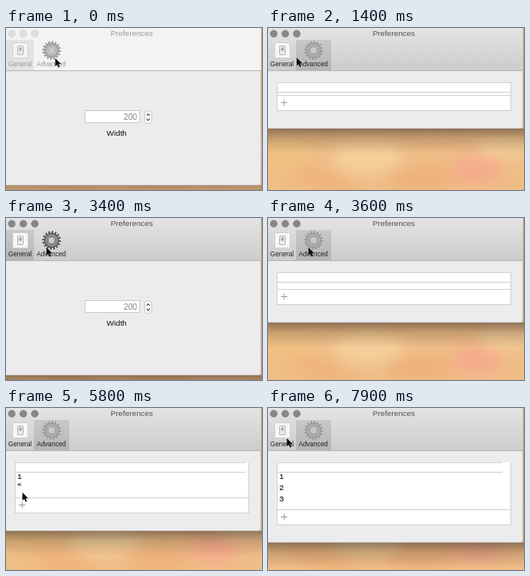
An HTML page that plays this animation: 320x203 px, repeating every 8 s.

```html
<!DOCTYPE html>
<html lang="en">
<head>
<meta charset="utf-8">
<title>Preferences window</title>
<style>
  html, body { margin: 0; width: 100%; height: 100%; overflow: hidden; background: #efbd87; }
  svg { display: block; width: 320px; height: 203px; }
  text { font-family: "Liberation Sans", Arial, sans-serif; font-size: 9.8px; fill: #111; }
  .label { font-size: 8.25px; text-anchor: middle; fill: #222; }
  .mid { text-anchor: middle; }
  .title { fill: #505050; }
  .lights circle { fill: #87878a; stroke: #79797c; stroke-width: .5; }
  .row text { stroke: #111; stroke-width: .15; }
  .crisp { shape-rendering: crispEdges; }
  .gear { color: #97979a; }
  .gear.down { color: #505052; }
  .down.switch { filter: brightness(.65); }
  .idle .title, .idle .label { fill: #9b9a9b; }
  .idle .lights circle { fill: #dedddf; stroke: #c9c8ca; }
  .idle #bar { fill: #f4f3f4; }
  .idle #tile { fill: #e2e1e3; }
  .idle .switch { opacity: .85; }
  .idle #shade { opacity: .65; }
</style>
</head>
<body>
<svg id="stage" viewBox="0 0 320 203">
  <defs>
    <linearGradient id="barFill" x2="0" y2="1">
      <stop stop-color="#e5e4e5"/><stop offset="1" stop-color="#cdcccd"/>
    </linearGradient>
    <linearGradient id="tileFill" x2="0" y2="1">
      <stop stop-color="#c9c8c9"/><stop offset="1" stop-color="#b6b5b6"/>
    </linearGradient>
    <linearGradient id="shadeFill" x2="0" y2="1">
      <stop stop-color="#2c2420" stop-opacity=".5"/>
      <stop offset=".4" stop-color="#3c2c20" stop-opacity=".22"/>
      <stop offset="1" stop-color="#4c3420" stop-opacity="0"/>
    </linearGradient>
    <filter id="soft" x="-50%" y="-50%" width="200%" height="200%"><feGaussianBlur stdDeviation="9"/></filter>
    <clipPath id="rowClip"><rect id="rowArea" x="12" width="291" y="81"/></clipPath>
  </defs>

  <rect width="320" height="203" fill="#efbd87"/>
  <g filter="url(#soft)">
    <ellipse cx="20" cy="160" rx="42" ry="20" fill="#f0c183"/>
    <ellipse cx="70" cy="192" rx="45" ry="12" fill="#efb27c" transform="rotate(20 70 192)"/>
    <ellipse cx="125" cy="163" rx="45" ry="20" fill="#f4cf9a"/>
    <ellipse cx="190" cy="188" rx="45" ry="14" fill="#eeb07c"/>
    <ellipse cx="262" cy="177" rx="32" ry="18" fill="#f5ab8b"/>
    <ellipse cx="295" cy="150" rx="35" ry="14" fill="#f3cd98"/>
  </g>
  <g id="shade">
    <rect id="below" width="320" height="32" fill="url(#shadeFill)"/>
    <rect id="side" x="319" width="1" fill="#3c2c20" opacity=".25"/>
  </g>

  <rect id="body" x="-8" y="-8" width="326.7" rx="4" fill="#ecebed" stroke="#a39d9a" stroke-width=".5"/>
  <rect id="bar" width="318.7" height="53" fill="url(#barFill)"/>
  <rect class="crisp" y="53" width="319" height="1" fill="#b8b7b8"/>
  <g class="lights">
    <circle cx="7.2" cy="7.2" r="4.4"/><circle cx="21.6" cy="7.2" r="4.4"/><circle cx="36" cy="7.2" r="4.4"/>
  </g>
  <text class="title mid" x="157.2" y="10.4">Preferences</text>

  <rect id="tile" class="crisp" y="15" height="38" fill="url(#tileFill)"/>
  <g class="switch" id="switch">
    <rect x="8.5" y="18.5" width="19" height="19" rx="1" fill="#f7f7f7" stroke="#cfcfcf"/>
    <rect x="14.5" y="22.5" width="7" height="11" rx=".8" fill="#ececec" stroke="#b2b2b2"/>
    <rect x="16.5" y="24.5" width="3" height="4" fill="#a2a2a2"/>
  </g>
  <text class="label" x="17.5" y="48">General</text>
  <g class="gear" id="gear" fill="none" stroke="currentColor">
    <circle cx="57" cy="28" r="10.4" stroke-width="2.6" pathLength="32" stroke-dasharray="1 1"/>
    <circle cx="57" cy="28" r="7.6" stroke-width="3.6"/>
    <circle cx="57" cy="28" r="7.3" stroke="#c6c5c4" stroke-width="1.6" opacity=".6"/>
    <circle cx="57" cy="28" r="4.6" fill="#c9c8c9" stroke-width="1"/>
  </g>
  <text class="label" x="56.5" y="48">Advanced</text>

  <g id="general">
    <rect x="99" y="103.5" width="68" height="15" fill="#fff" stroke="#c9c8ca"/>
    <text x="164" y="115.4" text-anchor="end" style="fill:#858585;font-size:10.2px">200</text>
    <rect x="173.5" y="104" width="8.5" height="15.5" rx="3" fill="#fff" stroke="#bcbbbd" stroke-width=".8"/>
    <path d="M175.9 109.8l1.9-2.2 1.9 2.2M175.9 113.7l1.9 2.2 1.9-2.2" fill="none" stroke="#444" stroke-width="1.1"/>
    <text class="mid" x="138.3" y="134.6">Width</text>
  </g>

  <g id="advanced">
    <rect id="list" x="11.5" y="68.5" width="292" fill="#fff" stroke="#d0cfd1"/>
    <rect id="headLine" class="crisp" x="12" y="80" height="1" fill="#d0cfd1"/>
    <rect id="corner" class="crisp" y="68" height="13" fill="#fff"/>
    <g clip-path="url(#rowClip)" id="rows"></g>
    <g id="footer">
      <rect class="crisp" x="12" width="291" height="1" fill="#d0cfd1"/>
      <path d="M16 9.5h8.4M20.2 5.3v8.4" stroke="#888" stroke-width=".8"/>
    </g>
  </g>

  <path id="cursor" d="M0 0V10.3L2.4 8.1 4 11.8 5.7 11.1 4.1 7.5H7.3Z" fill="#0c0c0c" stroke="#fff" stroke-width=".7" stroke-opacity=".5" paint-order="stroke"/>
</svg>
<script>
  const LOOP = 8000, STEP = 100, ROW = 13.6;
  const $ = id => document.getElementById(id);
  const set = (id, attrs) => {
    for (const name in attrs) $(id).setAttribute(name, attrs[name]);
  };
  const within = (t, from, to) => t >= from && t < to;

  // Keys are [ms, ...values]; values are joined linearly and held at both ends.
  function track(keys, t) {
    const next = keys.findIndex(k => k[0] > t);
    if (next < 0) return keys[keys.length - 1].slice(1);
    if (next === 0) return keys[0].slice(1);
    const a = keys[next - 1], b = keys[next];
    const p = (t - a[0]) / (b[0] - a[0]);
    return a.slice(1).map((v, i) => v + (b[i + 1] - v) * p);
  }

  const pointer = [
    [900, 61, 37], [1600, 25, 36], [2100, 25, 36], [2600, 47, 34], [2700, 49, 35],
    [3100, 49, 35], [3200, 50, 36], [3700, 50, 36], [4200, 20, 88], [4400, 20, 91],
    [4900, 20, 91], [5100, 20, 99], [5400, 20, 105], [6000, 20, 105], [6400, 20, 118],
    [6900, 20, 118], [7300, 32, 52], [7700, 23, 37]
  ];
  const bottom = [
    [200, 197], [300, 165], [400, 131], [500, 126],
    [1800, 126], [1900, 148], [2000, 177], [2100, 197],
    [3400, 197], [3500, 165], [3600, 131], [3700, 126],
    [4700, 126], [4900, 140], [5600, 140], [5800, 154], [6500, 154], [6700, 168.5]
  ];
  const headEnd = [[4700, 303], [5000, 301], [5700, 301], [5800, 299], [6600, 299], [6900, 293]];
  const rowStarts = [4800, 5700, 6600];
  const slide = [[0, -ROW], [100, -5.6], [200, -1], [300, 0]];

  // Each new row slides out from under the row above it.
  rowStarts.forEach((_, i) => {
    const top = 81 + i * ROW - (i ? .8 : 0);
    $("rows").insertAdjacentHTML("beforeend",
      `<clipPath id="slot${i}"><rect x="12" y="${top}" width="60" height="${ROW + 2}"/></clipPath>
       <g class="row" clip-path="url(#slot${i})"><text id="row${i}" x="14.2" y="${89.3 + i * ROW}">${i + 1}</text></g>`);
  });

  function draw(t) {
    const [b] = track(bottom, t), [end] = track(headEnd, t), [x, y] = track(pointer, t);
    const onAdvanced = within(t, 300, 1900) || t >= 3500;

    $("stage").classList.toggle("idle", t < 200);
    $("gear").classList.toggle("down", within(t, 200, 300) || within(t, 3400, 3500));
    $("switch").classList.toggle("down", within(t, 1800, 1900));
    set("general", { display: onAdvanced ? "none" : "inline" });
    set("advanced", { display: onAdvanced ? "inline" : "none" });
    set("tile", onAdvanced ? { x: 35, width: 44 } : { x: 0, width: 35 });

    set("body", { height: b + 8 });
    set("below", { y: b });
    set("side", { height: b });
    set("list", { height: Math.round(b) - 91 });
    set("headLine", { width: end - 12 });
    set("corner", { x: end, width: 303 - end });
    set("rowArea", { height: b - 123 });
    set("footer", { transform: `translate(0 ${Math.round(b) - 42})` });
    rowStarts.forEach((start, i) => set("row" + i, {
      display: t < start ? "none" : "inline",
      transform: `translate(0 ${track(slide, t - start)[0]})`
    }));
    set("cursor", { transform: `translate(${x + .5} ${y + .8})` });
  }

  const began = performance.now();
  function tick() {
    const t = (performance.now() - began) % LOOP;
    draw(Math.floor(t / STEP) * STEP);
    requestAnimationFrame(tick);
  }
  tick();
</script>
</body>
</html>
```
